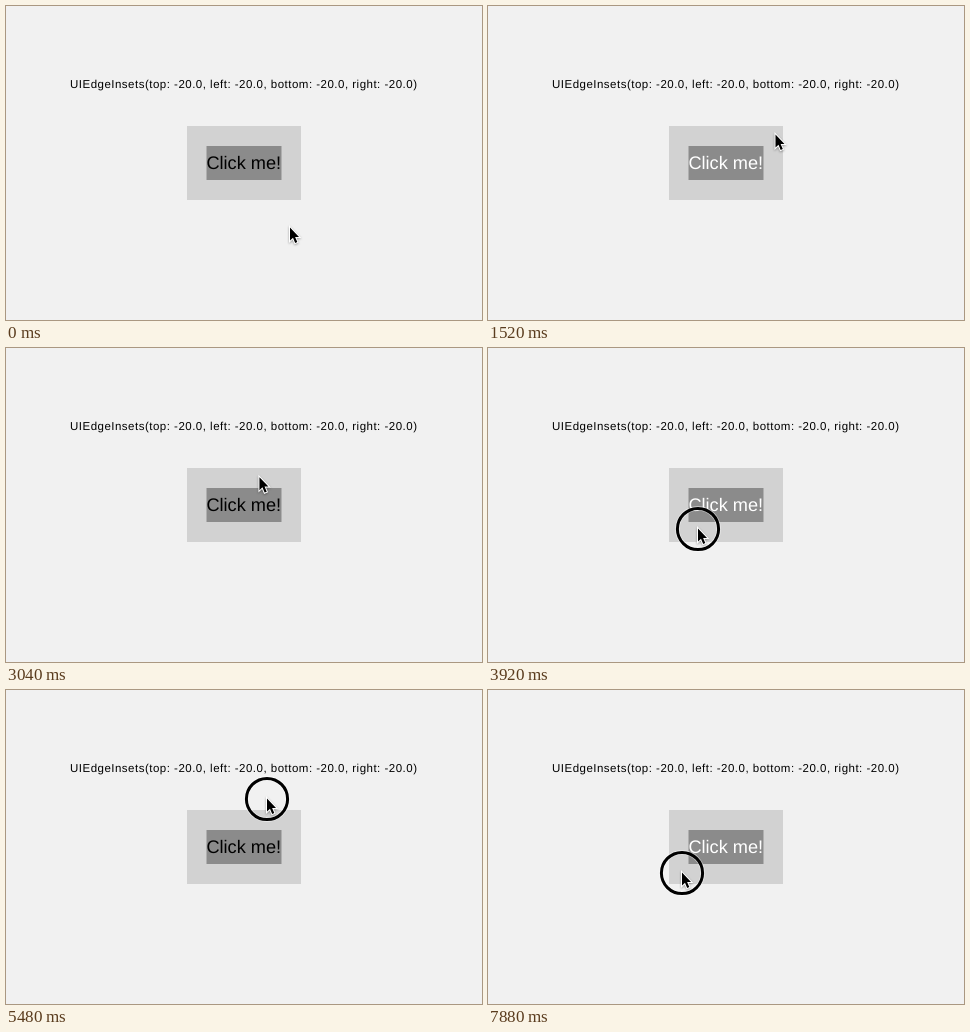
Animation of 476x314 px, one loop 8 s. Source, as an HTML page:

```html
<!DOCTYPE html>
<html lang="en">
<head>
<meta charset="utf-8">
<title>Button hit area</title>
<style>
  html, body { margin: 0; width: 100%; height: 100%; overflow: hidden; background: #f1f1f1; }
  svg { display: block; width: 100%; height: 100%; }
  text { font-family: "Liberation Sans", Arial, sans-serif; text-rendering: geometricPrecision; }
  #arrow { filter: drop-shadow(0 1px 1px rgba(0, 0, 0, .35)); }
</style>
</head>
<body>
<svg viewBox="0 0 476 314">
  <rect width="476" height="314" fill="#f1f1f1"/>
  <text x="64" y="81.5" font-size="11.5" letter-spacing=".49">UIEdgeInsets(top: -20.0, left: -20.0, bottom: -20.0, right: -20.0)</text>
  <rect x="181" y="120" width="114" height="74" fill="#d2d2d2"/>
  <rect x="200.5" y="140" width="75" height="34" fill="#8b8b8b"/>
  <text id="title" x="200.4" y="163" font-size="18.2">Click me!</text>
  <g id="pointer">
    <g id="ring" fill="none">
      <circle cx="1" cy="2" r="20.6" stroke="#fff" stroke-width="4.6" opacity=".5"/>
      <circle cx="1" cy="2" r="20.6" stroke="#000" stroke-width="3"/>
    </g>
    <path id="arrow" d="M1 1.6V14.6L4 11.8 6.2 17 8.3 16.1 6.1 11H10Z" stroke="#fff" stroke-width="2" paint-order="stroke"/>
  </g>
</svg>
<script>
const LOOP = 8000, TICK = 40;
const HOLD = 160, TITLE_LAG = 40;
const button = { left: 181, top: 120, right: 295, bottom: 194 };

const stops = [];
const via = (t, x, y) => stops.push({ t, x, y });
const click = (t, x, y) => {
  stops.push({ t, x, y, click: true });
  via(t + HOLD, x, y);
};

// The pointer tries the corners and the centre, then spots just outside
via(0, 283, 220);
click(120, 290, 206);
via(520, 269, 182);
click(840, 269, 182);
click(1360, 286.5, 127);
click(2040, 239, 154);
click(2680, 287, 128);
click(3280, 207, 127);
click(3800, 209, 179);
via(4200, 244, 165);
click(4600, 311, 202);
click(5360, 260, 107);
via(5880, 190, 92);
click(6240, 173, 152);
click(6960, 175, 204);
via(7560, 241, 190);
via(7800, 193, 181);
click(7880, 193, 181);

const clicks = stops.filter(s => s.click);
const $ = id => document.getElementById(id);
const title = $("title"), pointer = $("pointer"), ring = $("ring");

const slope = (a, b, axis) => (b[axis] - a[axis]) / (b.t - a.t);

// Smooth through moving points, zero at rests and turning points
function tangent(i, axis) {
  if (!stops[i - 1] || !stops[i + 1]) return 0;
  const a = slope(stops[i - 1], stops[i], axis);
  const b = slope(stops[i], stops[i + 1], axis);
  return a * b <= 0 ? 0 : 2 * a * b / (a + b);
}

function along(axis, t) {
  const i = stops.findIndex(s => s.t > t) - 1;
  const p = stops[i], q = stops[i + 1];
  const d = q.t - p.t, u = (t - p.t) / d, v = 1 - u;
  return v * v * (1 + 2 * u) * p[axis] + u * u * (1 + 2 * v) * q[axis]
    + d * u * v * (v * tangent(i, axis) - u * tangent(i + 1, axis));
}

const inside = (p, r) => p.x >= r.left && p.x < r.right && p.y >= r.top && p.y < r.bottom;

function draw(ms) {
  const t = Math.floor(ms % LOOP / TICK) * TICK;
  const active = lag => clicks.find(c => t >= c.t && t < c.t + HOLD + lag);
  const hit = active(TITLE_LAG);
  pointer.setAttribute("transform", `translate(${along("x", t)} ${along("y", t)})`);
  ring.setAttribute("visibility", active(0) ? "visible" : "hidden");
  title.setAttribute("fill", hit && inside(hit, button) ? "#fff" : "#000");
}

const start = performance.now();
function frame() {
  draw(performance.now() - start);
  requestAnimationFrame(frame);
}
frame();
</script>
</body>
</html>
```
